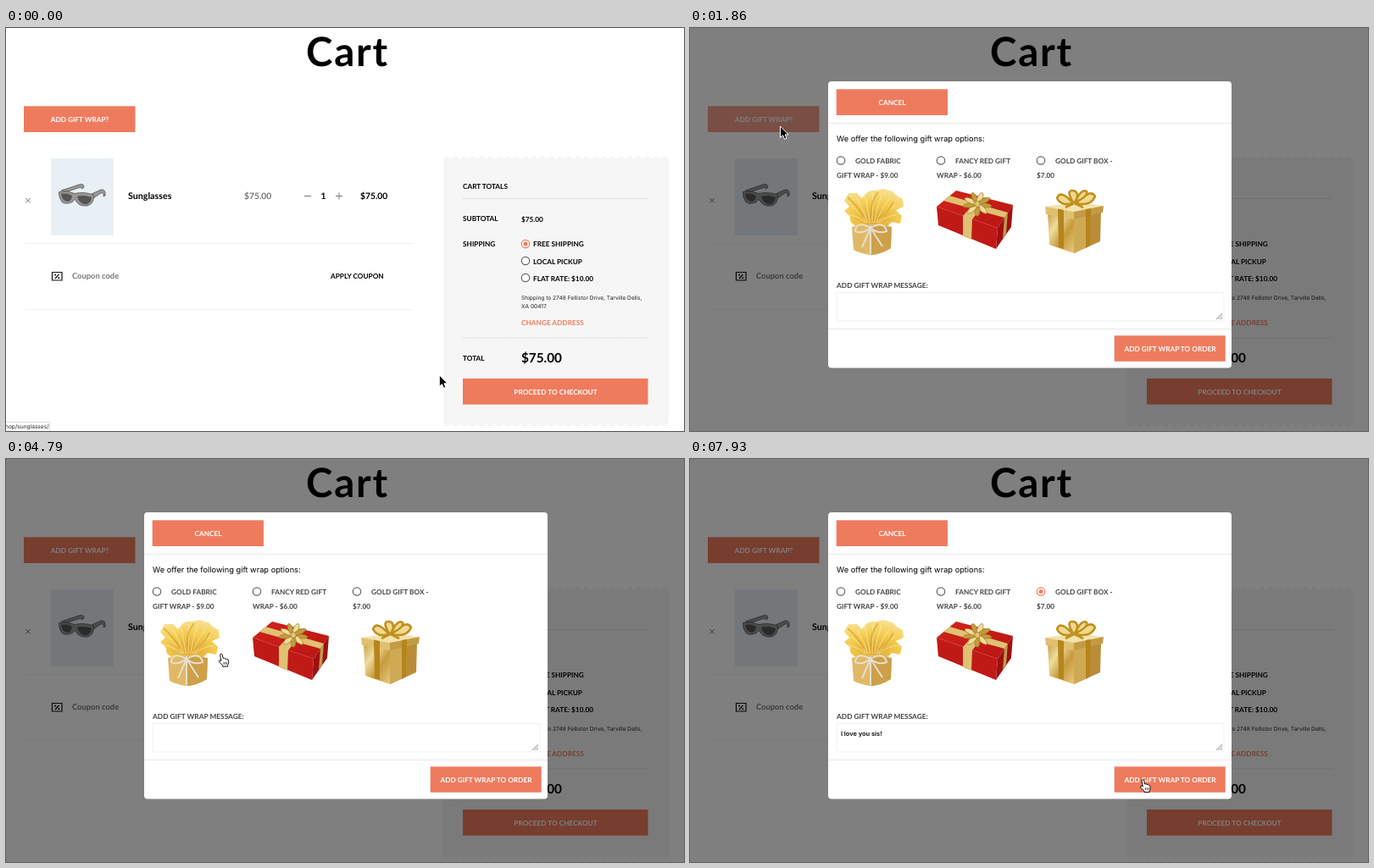
These frames come from a looping animation (800x476 px, 8 s). An HTML page:

```html
<!DOCTYPE html>
<html lang="en">
<head>
<meta charset="utf-8">
<title>Cart</title>
<style>
html, body { margin: 0; width: 100%; height: 100%; overflow: hidden; background: #fff; }
svg { display: block; }
text { font: 700 8.25px Lato, sans-serif; text-rendering: geometricPrecision; }
.title { font-size: 47.5px; letter-spacing: 1.8px; }
.plain { font: 400 6.6px Inter, sans-serif; fill: #222; }
.mid { text-anchor: middle; }
.white { fill: #fff; }
.grey { fill: #777; }
.dark { fill: #444; }
.item { font-size: 10.3px; }
.btn, .dot { fill: #ef7b5e; }
.line { stroke: #e8e8e8; fill: none; }
.faint { stroke: #f1f1f1; fill: none; }
.radio { fill: #fff; stroke: #666; stroke-width: 1.2; }
.on { stroke: #ef7b5e; }
.icon { fill: none; stroke: #777; }
</style>
</head>
<body>
<svg width="800" height="476" viewBox="0 0 800 476">
  <defs>
    <linearGradient id="gold" x2="1" y2="1">
      <stop stop-color="#c9a04a"/><stop offset=".3" stop-color="#efdc9c"/>
      <stop offset=".6" stop-color="#c79a3c"/><stop offset="1" stop-color="#e6cb80"/>
    </linearGradient>
    <linearGradient id="red" x2="1" y2="1">
      <stop stop-color="#d2231a"/><stop offset="1" stop-color="#b81512"/>
    </linearGradient>
    <radialGradient id="tissue" cy=".8" r=".9">
      <stop stop-color="#dca62c"/><stop offset=".5" stop-color="#f3cd52"/><stop offset="1" stop-color="#fae7a4"/>
    </radialGradient>
    <g id="bow" stroke="#9a701c" stroke-width=".6"></g>
  </defs>

  <!-- cart page -->
  <text x="403" y="45" class="mid title">Cart</text>
  <rect id="wrapBtn" class="btn" x="21" y="92.300" width="131.500" height="30.700"/>
  <text x="87" y="110.500" class="mid white">ADD GIFT WRAP?</text>

  <path class="icon" d="M23.300 201l5.400 5.400m0-5.400l-5.400 5.400"/>
  <rect x="53" y="154" width="74" height="91" fill="#e9f0f5"/>
  <g stroke="#555" stroke-linejoin="round" stroke-width=".8">
    <path d="M65 192L86 185Q92 183 92 188L90 190Q88 187 85 189L73 193ZM101 196L112 191Q118 190 117 198L115 199Q116 194 112 195L103 201Z" fill="#999"/>
    <path d="M62.500 193.500Q72 191.500 81 195.500Q92 193 103.500 197Q104 208 96 210Q85 211 82 203Q80 201.500 78.500 205.500Q70 209 66 205.500Q62 200 62.500 193.500Z" fill="#999"/>
    <path d="M65.500 196Q72 195 77.500 198Q77.500 203 74 204.500Q66.500 205 65.500 196ZM84.500 199Q92 197 100.500 200Q100.500 206 95 208Q86.500 208 84.500 199Z" fill="#555"/>
  </g>
  <text x="144" y="202" class="item" style="font-size:10.700px">Sunglasses</text>
  <text x="281" y="202" class="item grey">$75.00</text>
  <path class="icon" d="M352 198.500h8M389 198.500h8m-4-4v8"/>
  <text x="374.500" y="202" class="item mid">1</text>
  <text x="418" y="202" class="item">$75.00</text>
  <path class="faint" d="M23 254.500H480M23 332.500H480"/>
  <path d="M54.500 288.500h11.500v9.500h-11.500zM58 296l4.500-5" fill="none" stroke="#111" stroke-width="1.200"/>
  <circle cx="58.200" cy="291.500" r="1"/><circle cx="62.300" cy="295.300" r="1"/>
  <text x="78" y="296" class="grey" style="font-size:9.400px">Coupon code</text>
  <text x="383" y="295.500">APPLY COUPON</text>

  <!-- totals -->
  <rect x="516" y="154" width="266" height="314" fill="#f6f6f6"/>
  <path d="M520 154.500H781M520 468H781" stroke="#f6f6f6" stroke-width="6" stroke-linecap="round" stroke-dasharray="0 10.300"/>
  <text x="539" y="190">CART TOTALS</text>
  <path d="M539 201.500H758M539 366H758" stroke="#ccc" stroke-dasharray="1 1"/>
  <text x="539" y="228">SUBTOTAL</text>
  <text x="608" y="228.500">$75.00</text>
  <text x="539" y="258">SHIPPING</text>
  <circle class="radio on" cx="613" cy="255" r="4.700"/><circle class="dot" cx="613" cy="255" r="2.500"/>
  <circle class="radio" cx="613" cy="275" r="4.700"/>
  <circle class="radio" cx="613" cy="295" r="4.700"/>
  <text x="622" y="258">FREE SHIPPING</text>
  <text x="622" y="278.500">LOCAL PICKUP</text>
  <text x="622" y="298.500">FLAT RATE: $10.00</text>
  <text x="608" y="321.300" class="plain">Shipping to 2748 Fellistor Drive, Tarville Dells,</text>
  <text x="608" y="331.300" class="plain">XA 00417.</text>
  <text x="608" y="350.500" class="btn">CHANGE ADDRESS</text>
  <text x="539" y="393">TOTAL</text>
  <text x="608" y="394.500" style="font-size:15.300px">$75.00</text>
  <rect class="btn" x="539" y="414" width="218.500" height="30.700"/>
  <text x="648.500" y="432.500" class="mid white">PROCEED TO CHECKOUT</text>

  <g id="status">
    <path d="M0 465.500H51.500V476" fill="none" stroke="#ddd"/>
    <text x="-1" y="473" class="plain">hop/sunglasses/</text>
  </g>

  <!-- gift wrap dialog -->
  <g id="dialog">
    <rect width="800" height="476" fill-opacity=".5"/>
    <rect x="163" y="63" width="476" height="338.500" rx="4" fill="#fff"/>
    <path class="line" d="M163 112.500H639M163 355.500H639"/>
    <rect class="btn" x="172.700" y="72.300" width="131.300" height="30.700"/>
    <text x="238.500" y="91" class="mid white">CANCEL</text>
    <text x="173" y="133.500" class="plain" style="font-size:9.250px;fill:#000">We offer the following gift wrap options:</text>
    <g id="options"></g>
    <circle id="picked" class="dot" cx="414" cy="156.500" r="2.500"/>

    <!-- gold fabric -->
    <path d="M196 234Q187 230 189 223L182 216L188 211L182 204L187 195L197 195L203 201Q210 190 219 192L228 190L239 193L244 198L251 202L252 211L243 215L250 222L248 231L238 229L232 235Z" fill="url(#tissue)"/>
    <path id="folds" fill="none" stroke="#fff3c8" stroke-opacity=".6"/>
    <path d="M205 224Q198 210 186 200M214 222Q212 206 222 194M222 225Q234 219 240 205" fill="none" stroke="#d9a126" stroke-width="1.800" stroke-opacity=".7"/>
    <path d="M191 235Q213 228 238 235L237 260Q226 267 213 268Q200 266 193 262Z" fill="#e0b967"/>
    <path d="M214 233L238 235L237 260Q226 267 214 268Z" fill="#cda04a"/>
    <path d="M213 233V267M213 236Q196 227 195 240Q203 244 213 236Q229 227 232 240Q222 244 213 236L203 259M213 236L227 258" fill="none" stroke="#e6dfcc" stroke-width="2"/>

    <!-- red box -->
    <g fill="url(#red)">
      <path d="M291 211L314 192L381 209L363 236Z"/>
      <path d="M291 211L363 236L361 261L293 233Z" fill="#c01a16"/>
      <path d="M363 236L381 209L379 235L361 261Z" fill="#9c1010"/>
    </g>
    <path d="M322 222L342 199L352 202L333 226L332 250L322 246ZM299 204L306 198L375 218L371 224Z" fill="#e0c173"/>
    <path d="M371 224L375 218L373 243L369 249Z" fill="#c09a4c"/>
    <use href="#bow" transform="translate(339 208) scale(1.100 1.150)"/>

    <!-- gold box -->
    <path d="M422 219L453 224V266L424 256Z" fill="url(#gold)"/>
    <path d="M453 224L485 217L484 252L453 266Z" fill="#b98d38"/>
    <path d="M453 224L468 221L467 259L453 266Z" fill="#cfaa55"/>
    <path d="M419 211L455 206L488 210L453 217Z" fill="#f2e2ac"/>
    <path d="M419 211L453 217V226L420 220Z" fill="#dfc070"/>
    <path d="M453 217L488 210L487 218L453 226Z" fill="#c39b44"/>
    <path d="M434 213.500L441 215L441 261L435 259ZM467 214L473 213L472 257L467 260Z" fill="#b5851c"/>
    <g fill="#f0d98e" stroke="#c0901f" stroke-width="2.600" stroke-linejoin="round">
      <path d="M452 207Q437 190 433 201Q438 211 452 207ZM455 207Q473 189 478 199Q473 211 455 207Z"/>
      <path d="M452 206Q443 191 452 192Q460 193 455 206ZM454 206Q462 189 468 193Q470 199 454 206Z"/>
      <path d="M453 207L443 212M454 207L464 212" fill="none"/>
    </g>

    <text x="173" y="306.500" class="dark" style="font-size:8.350px">ADD GIFT WRAP MESSAGE:</text>
    <rect class="faint" x="173" y="312.500" width="457" height="33.500"/>
    <path d="M621 344l7-7m-4.500 7l4.500-4.500m-2 4.500l2-2" stroke="#777" stroke-width=".8"/>
    <text id="message" x="178" y="327" class="plain" style="font-size:7.400px;font-weight:700"></text>
    <rect id="caret" y="319" width="1" height="10.500"/>
    <rect class="btn" x="500.700" y="363.300" width="131" height="30.500"/>
    <text x="566.500" y="381.500" class="mid white">ADD GIFT WRAP TO ORDER</text>
  </g>

  <circle id="ring" fill="none" stroke="#111" stroke-width="1.200"/>
  <g id="cursor">
    <path id="arrow" d="M0 0V13.500L3.100 10.700L5.200 15.400L7.500 14.400L5.600 9.900H9.700Z" stroke="#fff"/>
    <g id="hand" stroke="#111" stroke-linejoin="round">
      <path d="M3.300 9L2 2.300Q2 .6 3.300.6Q4.300.6 4.700 2.200L5.700 6Q7.400 5.200 8 6.500Q9.600 5.900 10.100 7.200Q11.700 6.900 12 8.600V11Q12 13 11 14V15.500H5V14.300L1 10.300Q0 8.700 1.200 8.200Q2.400 8.100 3.300 9Z" fill="#fff"/>
      <path d="M6.300 10.200v3M8.100 10.200v3M9.900 10.200v3" stroke-width=".7"/>
    </g>
  </g>
</svg>
<script>
const $ = id => document.getElementById(id);
const show = (id, on) => { $(id).style.display = on ? '' : 'none'; };
const clamp = v => Math.min(1, Math.max(0, v));

$('options').innerHTML = [
  [173, 'GOLD FABRIC', 'GIFT WRAP - $9.00'],
  [291, 'FANCY RED GIFT', 'WRAP - $6.00'],
  [409, 'GOLD GIFT BOX -', '$7.00']
].map(([x, a, b], i) => `<circle id="radio${i}" class="radio" cx="${x + 5}" cy="156.5" r="4.7"/>
  <text class="dark" x="${x + 22}" y="159.5">${a}</text><text class="dark" x="${x}" y="176.5">${b}</text>`).join('');

$('bow').innerHTML = Array.from({length: 9}, (_, i) =>
  `<ellipse cx="8" rx="7.5" ry="2.8" fill="${i % 2 ? '#f0dc9c' : '#c49a40'}" transform="scale(1 .8) rotate(${i * 40 + 10})"/>`
).join('') + '<circle r="3" fill="#e3c36c"/>';

$('folds').setAttribute('d', Array.from({length: 9}, (_, i) => {
  const a = Math.PI * (1.08 + i * .105);
  return `M${215 + 8 * Math.cos(a)} 230Q${215 + 16 * Math.cos(a)} ${226 + 14 * Math.sin(a)} ${216 + 31 * Math.cos(a)} ${228 + 33 * Math.sin(a)}`;
}).join(''));

// time, x, y
const path = [
  [0, 511, 410], [200, 575, 395], [400, 662, 320], [600, 600, 240], [800, 470, 190], [930, 438, 198],
  [1220, 438, 198], [1500, 229, 140], [1570, 229, 140], [1640, 106.5, 116], [1980, 106.5, 116], [2290, 187, 199],
  [2720, 187, 199], [3000, 464, 246], [3930, 464, 246], [4000, 386, 214], [4290, 195, 204],
  [4500, 195, 204], [4790, 250, 229.5], [5140, 469, 247], [5220, 469, 247], [5360, 485, 156],
  [5500, 485, 156], [5640, 203, 318], [7860, 351, 357], [7930, 531, 378], [8000, 531, 378]
];
const clicks = [[1710, 106, 116], [5360, 488, 157], [5640, 205, 320]];
const words = 'I love you sis!';
// time, letters typed
const keys = [[0, 0], [6070, 1], [6210, 3], [6280, 4], [6350, 5], [6430, 6], [6500, 9], [6570, 10],
  [6860, 12], [6930, 13], [7000, 14], [7210, 15]];

function place(t) {
  const i = path.findIndex(p => p[0] > t);
  const [t0, x0, y0] = path[i - 1], [t1, x1, y1] = path[i];
  const k = (t - t0) / (t1 - t0);
  return [x0 + (x1 - x0) * k, y0 + (y1 - y0) * k];
}

function draw(t) {
  show('status', t < 200);
  show('dialog', t >= 1860);
  $('wrapBtn').style.fillOpacity = 1 - .27 * (t < 1860 ? clamp((t - 1600) / 150) : clamp((2250 - t) / 350));

  const chosen = t >= 5430;
  show('picked', chosen);
  $('radio2').classList.toggle('on', chosen);

  $('message').textContent = words.slice(0, keys.findLast(k => k[0] <= t)[1]);
  show('caret', t >= 5790 && t < 7570);
  if (t >= 5790) $('caret').setAttribute('x', 178.3 + $('message').getComputedTextLength());

  const click = clicks.find(c => t >= c[0] && t < c[0] + 150);
  show('ring', click);
  if (click) {
    $('ring').setAttribute('cx', click[1]);
    $('ring').setAttribute('cy', click[2]);
    $('ring').setAttribute('r', 10 + 17 * clamp((t - click[0]) / 80));
  }

  const hand = t >= 1640 && t < 1860 || t >= 2200 && t < 5640 || t >= 7900;
  show('cursor', t < 5790 || t >= 7860);
  show('hand', hand);
  show('arrow', !hand);
  $('cursor').setAttribute('transform', `translate(${place(t)})`);
}

const start = performance.now();
(function tick() {
  draw((performance.now() - start) % 8000);
  requestAnimationFrame(tick);
})();
</script>
</body>
</html>
```
